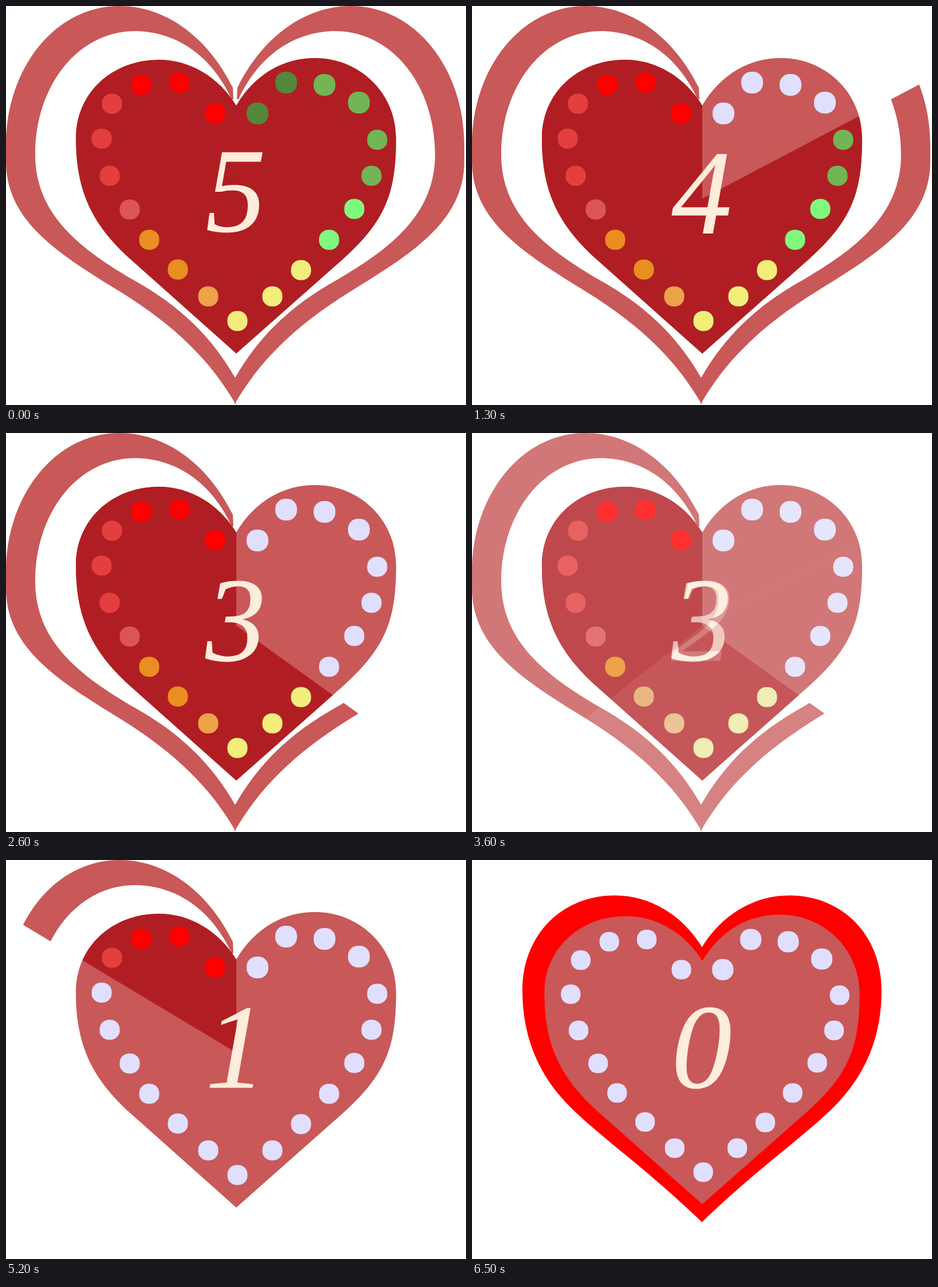
Write an HTML page with a canvas that moves like this. It is 803x698 px and loops after 6.6 s.

```html
<!DOCTYPE html>
<html lang="en">
<head>
<meta charset="utf-8">
<title>Heart countdown</title>
<style>
  html, body { margin: 0; width: 100%; height: 100%; overflow: hidden; background: #fff; }
  canvas { display: block; }
</style>
</head>
<body>
<canvas id="stage" width="803" height="698"></canvas>
<script>
const W = 803, H = 698, CX = 402, CY = 337;
const LIGHT = '#c95859', DARK = '#b01e23', OFF = '#e1dffe', CREAM = '#feecdc';

// A left half and its mirror image; axis2 is twice the x of the mirror line.
function mirrored(d, axis2) {
  const left = new Path2D(d), right = new Path2D();
  right.addPath(left, new DOMMatrix([-1, 0, 0, 1, axis2, 0]));
  return [left, right];
}

const heart = [new Path2D(
  'M402 174C372 125 322 94 267 94C187 94 122 150 122 232C122 320 148 380 215 441' +
  'L402 608L588 443C664 375 681 325 681 232C681 150 615 91 540 91C485 91 435 118 402 174Z')];
const ring = mirrored(
  'M396 143C350 50 275 0 198 0C85 0 0 110 0 243V272C0 378 95 435 198 499C300 562 360 625 401 697' +
  'V652C360 580 305 525 222 479C130 425 51 365 51 260C51 140 125 44 225 44C295 44 358 85 394 163H397Z', 800);
const border = mirrored(
  'M402 153C368 97 312 62 249 62C156 62 88 132 88 228C88 300 110 365 160 420C210 475 300 535 402 634Z', 803);

// Runs of equally coloured dots, clockwise from the notch.
const dots = [
  ['#53873b', [439, 188], [489, 134]],
  ['#72b554', [556, 138], [616, 169], [648, 234], [638, 297]],
  ['#81f97f', [608, 355], [564, 409]],
  ['#f3ee7b', [515, 462], [465, 508], [404, 551]],
  ['#eda348', [353, 508]],
  ['#e98e20', [300, 461], [250, 409]],
  ['#dc5556', [216, 356]],
  ['#e53e3e', [181, 297], [167, 232], [185, 171]],
  ['#ff0000', [236, 138], [303, 134], [365, 188]]
].flatMap(([color, ...points]) => points.map(([x, y]) => ({ color, x, y })));

// Swept angle in degrees from the top, and dots switched off, per digit.
const stages = [
  { digit: 5, angle: 0, off: 0 },
  { digit: 4, angle: 62.2, off: 4 },
  { digit: 3, angle: 125.8, off: 8 },
  { digit: 2, angle: 231.5, off: 13 },
  { digit: 1, angle: 301, off: 17 },
  { digit: 0, angle: 360, off: 21 }
];

function scaleAbout(c, x, y, sx, sy) {
  c.translate(x, y);
  c.scale(sx, sy);
  c.translate(-x, -y);
}

function fill(c, paths, color) {
  c.fillStyle = color;
  paths.forEach(path => c.fill(path));
}

function clipRemaining(c, angle) {
  if (!angle) return;
  c.beginPath();
  c.moveTo(CX, CY);
  c.arc(CX, CY, 900, (angle - 90) * Math.PI / 180, 1.5 * Math.PI);
  c.clip();
}

function drawHeart(c, { angle }) {
  c.save();
  if (angle === 360) {
    fill(c, border, '#ff0000');
    scaleAbout(c, 402, 310, 0.984, 0.98);
    fill(c, heart, LIGHT);
  } else {
    if (angle) fill(c, heart, LIGHT);
    if (angle > 63) {
      c.strokeStyle = '#cc615d';
      c.beginPath();
      c.moveTo(CX, CY);
      c.lineTo(676, 191);
      c.stroke();
    }
    clipRemaining(c, angle);
    fill(c, ring, LIGHT);
    fill(c, heart, DARK);
  }
  c.restore();
}

function drawDots(c, { angle, off }) {
  c.save();
  if (angle === 360) scaleAbout(c, 388, 345, 0.976, 0.976);
  dots.forEach(({ color, x, y }, i) => {
    const size = i < 4 ? 38 : 35;
    c.fillStyle = i < off ? OFF : color;
    c.beginPath();
    c.roundRect(x - size / 2, y - size / 2, size, size, size * 0.46);
    c.fill();
  });
  c.restore();
}

function drawDigit(c, { digit }) {
  const y = digit === 5 ? 394 : 398;
  c.font = 'italic 210px "Liberation Serif", "Times New Roman", serif';
  c.textAlign = 'center';
  c.fillStyle = c.strokeStyle = CREAM;
  c.fillText(digit, 401, y);
  c.strokeText(digit, 401, y);
}

// Pictures stay transparent outside their shapes, so a fade shows white through both.
function render(stage) {
  const canvas = document.createElement('canvas');
  canvas.width = W;
  canvas.height = H;
  const c = canvas.getContext('2d');
  drawHeart(c, stage);
  drawDots(c, stage);
  drawDigit(c, stage);
  return canvas;
}

const pictures = stages.map(render);
const ctx = document.getElementById('stage').getContext('2d');
const HOLD = 1000, STEP = 100, FADE_STEPS = 4, LOOP = 6600;
const PERIOD = HOLD + (FADE_STEPS - 1) * STEP;

function show(picture, alpha) {
  ctx.globalAlpha = alpha;
  ctx.drawImage(picture, 0, 0);
}

function frame() {
  const t = performance.now() % LOOP;
  const index = Math.min(Math.floor(t / PERIOD), 4);
  const step = Math.floor((t - index * PERIOD - HOLD) / STEP) + 1;
  const fade = Math.min(Math.max(step / FADE_STEPS, 0), 1);
  ctx.clearRect(0, 0, W, H);
  show(pictures[index], 1 - fade);
  show(pictures[index + 1], fade);
  requestAnimationFrame(frame);
}
frame();
</script>
</body>
</html>
```
